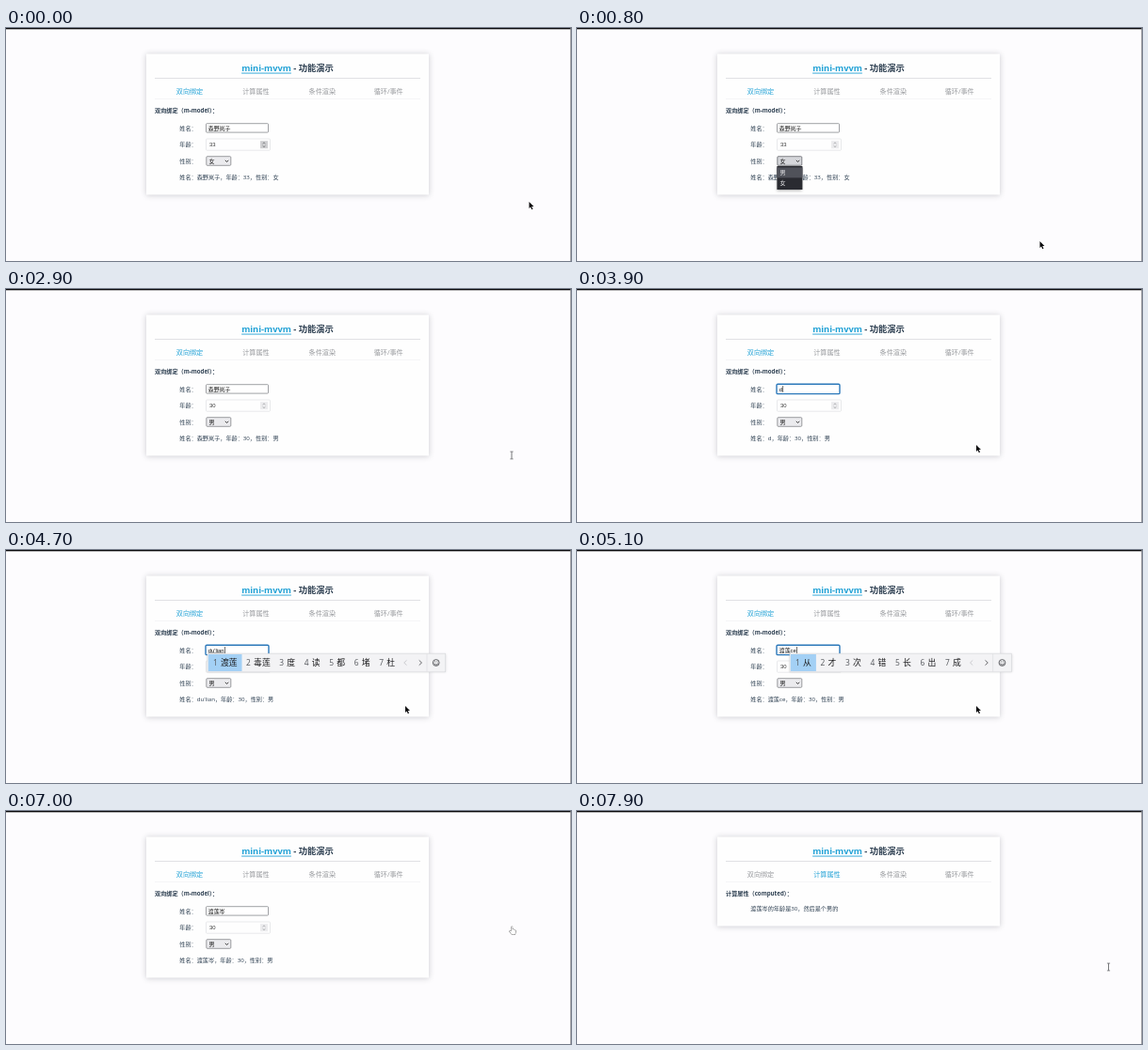
These frames come from a looping animation (600 px wide and 248 px high, 8000 ms). An HTML page with a canvas:

```html
<!DOCTYPE html>
<html lang="zh-CN">
<head>
<meta charset="utf-8">
<title>mini-mvvm</title>
<style>
html, body { margin: 0; width: 100%; height: 100%; overflow: hidden; background: #fdfcfe; }
canvas { display: block; width: 600px; height: 248px; }
</style>
</head>
<body>
<canvas id="stage"></canvas>
<script>
const LOOP = 8000, STEP = 100;
const UI = '"Open Sans", "Noto Sans CJK SC", "Noto Sans CJK", sans-serif';
const FIELD = '"Liberation Sans", "Noto Sans CJK SC", "Noto Sans CJK", sans-serif';
const INK = '#2c3e50', BLUE = '#22a2d6';
const TABS = ['双向绑定', '计算属性', '条件渲染', '循环/事件'];

const canvas = document.getElementById('stage');
const c = canvas.getContext('2d');
const dpr = Math.max(1, window.devicePixelRatio || 1);
canvas.width = 600 * dpr;
canvas.height = 248 * dpr;

// Pointer stops: time, x, y, shape
const POINTER = [
  [0, 555.5, 185, 'arrow'], [100, 549, 189, 'arrow'], [300, 506, 206, 'arrow'],
  [500, 482, 212, 'arrow'], [700, 486, 221, 'arrow'], [800, 491.5, 227, 'arrow'],
  [1200, 491, 250, 'none'], [1500, 490, 229.5, 'arrow'], [1700, 525, 207, 'arrow'],
  [1900, 554, 190, 'arrow'], [2400, 554, 190, 'arrow'], [2700, 547, 186, 'arrow'],
  [2900, 537, 177, 'beam'], [3000, 528, 161, 'beam'], [3200, 480, 161, 'beam'],
  [3300, 443, 167.5, 'arrow'], [3400, 430, 167, 'arrow'], [3500, 424, 166, 'arrow'],
  [5700, 424, 166, 'arrow'], [5900, 475, 148, 'arrow'], [6100, 560, 124, 'arrow'],
  [6300, 584, 122, 'arrow'], [6400, 566, 123, 'hand'], [6500, 548, 123, 'hand'],
  [6600, 530, 123, 'hand'], [6700, 520.5, 123, 'hand'], [6800, 534.5, 122.5, 'hand'],
  [7700, 534.5, 122.5, 'hand'], [7800, 548, 144, 'arrow'], [7900, 564.5, 166, 'beam']
];

// Name field: time, value
const NAME = [
  [0, '森野岚子'], [3900, 'd'], [4200, 'du'], [4400, "du'l"], [4500, "du'li"],
  [4600, "du'lia"], [4700, "du'lian"], [4800, '渡莲'], [4900, '渡莲c'],
  [5100, '渡莲ce'], [5300, '渡莲cen'], [5700, '渡莲岑']
];

// Input method: time, left edge, candidates
const WORDS = [
  [0, 0, ''],
  [4000, 214, '的 点 都 到 大 地 得'],
  [4300, 214, '度 读 都 堵 杜 毒 肚'],
  [4400, 214, '独立 毒辣 都来 度量 堵路 读了 度'],
  [4600, 214, '独恋 毒莲 都俩 度 读 都 堵'],
  [4700, 214, '渡莲 毒莲 度 读 都 堵 杜'],
  [4800, 0, ''],
  [5000, 226, '从 才 次 错 长 出 成'],
  [5200, 226, '测 策 册 侧 厕 参差 层次'],
  [5400, 226, '岑 涔涔 参差 涔 曾 层 测'],
  [5700, 0, '']
];

const AGE = [[0, 33], [1900, 32], [2100, 31], [2300, 30]];

const at = (list, t) => list.filter(k => k[0] <= t).pop();

function pointer(t) {
  const a = at(POINTER, t), b = POINTER[POINTER.indexOf(a) + 1];
  if (!b || a[3] === 'none') return a.slice(1);
  const f = (t - a[0]) / (b[0] - a[0]);
  if (b[3] === 'none') return a.slice(1);
  return [a[1] + (b[1] - a[1]) * f, a[2] + (b[2] - a[2]) * f, a[3]];
}

function setFont(size, font = UI, weight = 400) {
  c.font = `${weight} ${size}px ${font}`;
}

// Draws text centred on y; returns its width
function text(s, x, y, size, color = INK, { font = UI, weight = 400, align = 'left' } = {}) {
  setFont(size, font, weight);
  c.textAlign = align;
  c.fillStyle = color;
  c.fillText(s, x, y + size * 0.37);
  return c.measureText(s).width;
}

function rect(x, y, w, h, fill) {
  c.fillStyle = fill;
  c.fillRect(x, y, w, h);
}

function box(x, y, w, h, r, fill, line, width = 0.7) {
  c.beginPath();
  c.roundRect(x, y, w, h, r);
  c.fillStyle = fill;
  c.fill();
  if (!line) return;
  c.strokeStyle = line;
  c.lineWidth = width;
  c.stroke();
}

function lines(points, color, width) {
  c.beginPath();
  points.forEach(([x, y], i) => i ? c.lineTo(x, y) : c.moveTo(x, y));
  c.strokeStyle = color;
  c.lineWidth = width;
  c.stroke();
}

function shadow(color, blur, dy) {
  c.shadowColor = color;
  c.shadowBlur = blur * dpr;
  c.shadowOffsetY = dy * dpr;
}

function mix(a, b, f) {
  return `rgb(${a.map((v, i) => Math.round(v + (b[i] - v) * f))})`;
}

function drawCard(t) {
  const second = t >= 7400;
  shadow('rgba(40,45,60,.24)', 6, 0.6);
  rect(149, 27.5, 300, second ? 95 : 150, '#fefefe');
  shadow('transparent', 0, 0);

  setFont(9.3, UI, 700);
  const link = 'mini-mvvm', rest = ' - 功能演示';
  const lw = c.measureText(link).width;
  const x = 299 - (lw + c.measureText(rest).width) / 2;
  text(link, x, 43, 9.3, BLUE, { weight: 700 });
  rect(x, 47.6, lw, 0.9, BLUE);
  text(rest, x + lw, 43, 9.3, INK, { weight: 700 });
  rect(158, 53.2, 282, 0.8, '#d9dade');

  const f = second ? Math.min(1, (t - 7300) / 300) : 0;
  const grey = [150, 152, 156], blue = [34, 162, 214];
  TABS.forEach((s, i) => {
    const on = i === 0 ? 1 - f : i === 1 ? f : 0;
    text(s, 195 + i * 70.4, 67, 7.1, mix(grey, blue, on), { align: 'center' });
  });
  rect(158, 75, 282, 0.6, '#f0f0f3');
}

function drawName(t, name) {
  const focus = t >= 3000 && t < 7000;
  if (focus) box(212, 101.2, 67, 10.4, 1.2, '#fff', '#2b78ba', 1.4);
  else box(212.5, 101.7, 66, 9.4, 0.8, '#fff', '#777a7e');
  setFont(5.9, FIELD);
  const w = c.measureText(name).width;
  const opt = { font: FIELD };
  if (t >= 3100 && t < 3900) {
    const from = Math.max(0, Math.min(w, w * (3300 - t) / 200));
    rect(214.8 + from, 102.8, w - from, 7.2, '#2f7fd6');
    text(name, 214.8, 106.4, 5.9, '#111', opt);
    c.save();
    c.beginPath();
    c.rect(214.8 + from, 102, w - from, 9);
    c.clip();
    text(name, 214.8, 106.4, 5.9, '#fff', opt);
    c.restore();
    return;
  }
  text(name, 214.8, 106.4, 5.9, '#111', opt);
  if (t >= 4700 && t < 4800) rect(214.8, 109.6, w, 0.4, '#333');
  if (focus && t < 6200) rect(215.2 + w, 103, 0.6, 7, '#111');
}

function drawAge(t, age) {
  const hover = t < 200 || (t >= 1800 && t < 2600);
  box(212.5, 118, 68, 12.2, 1, '#fefefe', '#dfe0e3');
  text(String(age), 216, 124.3, 5.9, '#333', { font: FIELD });
  rect(270, 120.2, 8, 8, hover ? '#cfcfd1' : '#ececee');
  const ink = hover ? '#55585c' : '#909296';
  lines([[272.6, 123.1], [274, 121.8], [275.4, 123.1]], ink, 0.7);
  lines([[272.6, 125.4], [274, 126.7], [275.4, 125.4]], ink, 0.7);
}

function drawSex(t, sex) {
  const open = t >= 500 && t < 1500;
  box(212.8, 136.7, 26, 9.6, 1, open ? '#d5d6da' : '#ebebee', open ? '#55575c' : '#74767a');
  text(sex, 215.6, 141.6, 6, '#111', { font: FIELD });
  lines([[232.8, 140.8], [234.5, 142.5], [236.2, 140.8]], '#222', 0.9);
}

function drawMenu(t) {
  if (t < 500 || t >= 1500) return;
  shadow('rgba(0,0,0,.35)', 3, 1);
  rect(212.4, 147, 27, 25, '#2a2b31');
  shadow('transparent', 0, 0);
  rect(212.4, t >= 800 ? 148.4 : 159.8, 27, 11, '#50525a');
  text('男', 215.6, 154, 6, '#f3f3f5', { font: FIELD });
  text('女', 215.6, 165.2, 6, '#f3f3f5', { font: FIELD });
}

function drawWords(t) {
  const [, left, list] = at(WORDS, t);
  if (!list) return;
  const words = list.split(' ');
  const span = s => 17.9 + s.length * 8.6;
  const end = left + 6 + words.reduce((sum, s) => sum + span(s), 0);
  shadow('rgba(0,0,0,.16)', 2.5, 0.6);
  rect(left, 110.2, end + 44 - left, 19.6, '#f3f3f5');
  shadow('transparent', 0, 0);
  c.strokeStyle = '#d8d9dc';
  c.lineWidth = 0.6;
  c.strokeRect(left, 110.2, end + 44 - left, 19.6);
  rect(left + 0.8, 111, span(words[0]) + 0.6, 18, '#a3d0f5');

  let x = left + 6;
  words.forEach((s, i) => {
    text(String(i + 1), x, 120.2, 8.4, '#55585d');
    text(s, x + 8, 120, 8.8, '#1c1c1e');
    x += span(s);
  });
  const arrow = (ax, d, color) =>
    lines([[ax - d, 117.4], [ax + d, 120], [ax - d, 122.6]], color, 0.8);
  arrow(end + 1.4, -1.4, '#bfc0c4');
  arrow(end + 17.4, 1.4, '#44464a');
  rect(end + 24, 110.6, 0.6, 18.8, '#dadbde');

  const sx = end + 34, sy = 120;
  c.strokeStyle = '#3a3c40';
  c.lineWidth = 0.8;
  c.beginPath();
  c.arc(sx, sy, 3.4, 0, 7);
  c.moveTo(sx + 1.8, sy + 0.6);
  c.arc(sx, sy + 0.4, 1.8, 0.1, Math.PI - 0.1);
  c.stroke();
  rect(sx - 1.6, sy - 1.5, 0.9, 0.9, '#3a3c40');
  rect(sx + 0.7, sy - 1.5, 0.9, 0.9, '#3a3c40');
}

function drawPointer([x, y, shape]) {
  if (shape === 'none') return;
  c.save();
  c.translate(x, y);
  if (shape === 'beam') {
    lines([[0, -3.8], [0, 3.8]], '#55565a', 0.8);
    lines([[-1.6, -3.9], [1.6, -3.9]], '#55565a', 0.7);
    lines([[-1.6, 3.9], [1.6, 3.9]], '#55565a', 0.7);
  } else {
    const path = shape === 'arrow'
      ? 'M0 0V7L1.6 5.6L2.8 8.3L4 7.7L2.8 5.1H5Z'
      : 'M2 0.8Q2.6 -.2 3.2 .8V3.4L6 4Q7 4.3 6.8 5.6L6 9H2.6L.3 5.8Q.1 4.8 1 5L2 5.8Z';
    const p = new Path2D(path);
    c.lineWidth = 0.7;
    c.fillStyle = shape === 'arrow' ? '#0c0c0e' : '#fff';
    c.strokeStyle = shape === 'arrow' ? 'rgba(255,255,255,.7)' : '#222';
    c.stroke(p);
    c.fill(p);
  }
  c.restore();
}

function draw(t) {
  c.setTransform(dpr, 0, 0, dpr, 0, 0);
  rect(0, 0, 600, 248, '#fdfcfe');
  rect(0, 0, 600, 1.3, '#0b0b0d');
  rect(599.3, 0, 0.7, 248, '#85868a');
  drawCard(t);

  const name = at(NAME, t)[1], age = at(AGE, t)[1], sex = t < 1500 ? '女' : '男';
  const bold = { weight: 700 };
  if (t < 7400) {
    text('双向绑定（m-model）：', 158, 87.4, 6.15, INK, bold);
    ['姓名：', '年龄：', '性别：'].forEach((s, i) => text(s, 184.3, 106.4 + i * 17.7, 6.15));
    drawName(t, name);
    drawAge(t, age);
    drawSex(t, sex);
    text(`姓名：${name}，年龄：${age}，性别：${sex}`, 184.3, 158.8, 6.15);
    drawMenu(t);
    drawWords(t);
  } else {
    text('计算属性（computed）：', 158, 87.4, 6.15, INK, bold);
    text(`${name}的年龄是${age}，然后是个${sex}的`, 184.3, 104, 6.15);
  }
  drawPointer(pointer(t));
}

const start = performance.now();
function tick() {
  const t = (performance.now() - start) % LOOP;
  draw(Math.floor(t / STEP) * STEP);
  requestAnimationFrame(tick);
}
tick();
</script>
</body>
</html>
```
